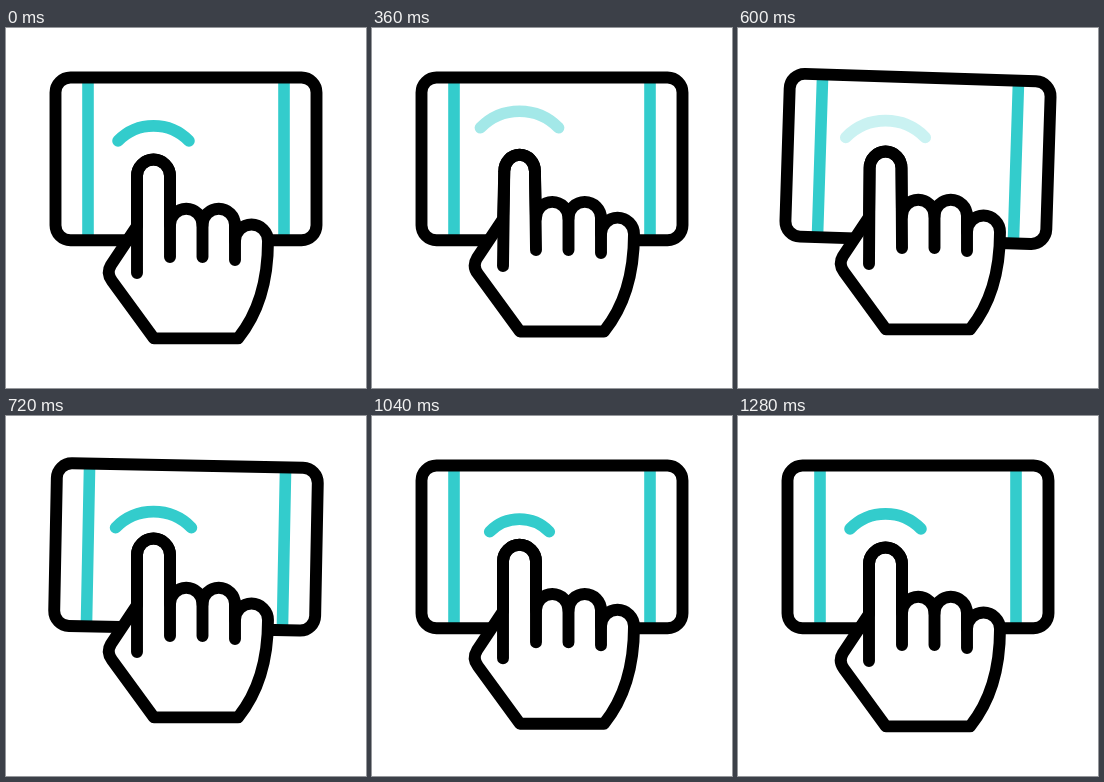
Recreate the animation shown at these times as an HTML page. Size 360x360 px, loop 1.32 s.

```html
<!DOCTYPE html>
<html lang="en">
<head>
<meta charset="utf-8">
<title>Touch screen tap</title>
<style>
  html, body { margin: 0; width: 100%; height: 100%; overflow: hidden; background: #fff; }
  svg { display: block; width: 100vw; height: 100vh; }
  path, rect { fill: none; stroke-linecap: round; stroke-linejoin: round; }
  .ink { stroke: #000; stroke-width: 11.9; }
  .teal { stroke: #33cccc; stroke-width: 11.6; }
  #body { fill: #fff; }
</style>
</head>
<body>
<svg viewBox="0 0 360 360">
  <g id="phone">
    <path class="teal" d="M82 52V210M278 52V210"/>
    <rect class="ink" x="49.5" y="49.5" width="261" height="162.8" rx="15"/>
  </g>
  <path id="wave" class="teal"/>
  <g id="hand">
    <path id="body" class="ink"/>
    <path id="finger" class="ink"/>
  </g>
</svg>
<script>
const LOOP = 1320, STEP = 40;
const $ = id => document.getElementById(id);
const set = (id, name, value) => $(id).setAttribute(name, value);

// Eased 0 to 1 between two times
function ease(t, from, to) {
  const u = Math.min(1, Math.max(0, (t - from) / (to - from)));
  return u * u * (3 - 2 * u);
}

// Rises from 0 to 1 and back between two times
function bump(t, from, to) {
  return t < from || t > to ? 0 : Math.sin(Math.PI * (t - from) / (to - from)) ** 2;
}

function drawPhone(t) {
  set('phone', 'transform', `rotate(${2 * bump(t, 450, 820)} 180 130.75)`);
}

// The ripple grows and drifts off, then returns and settles
function drawWave(t) {
  const size = 1 + 0.12 * ease(t, 120, 440) - 0.29 * ease(t, 640, 940) + 0.17 * ease(t, 1000, 1280);
  const rise = 13.5 * ease(t, 120, 440) * (1 - ease(t, 520, 620));
  const half = 35.5 * size, r = 49.5 * size, y = 130.2 - 17.3 * size - rise;
  set('wave', 'd', `M${147.5 - half} ${y}A${r} ${r} 0 0 1 ${147.5 + half} ${y}`);
  set('wave', 'opacity', 1 - ease(t, 200, 500) + ease(t, 560, 680));
}

// The index finger shortens and narrows while pressing
function drawHand(t) {
  const lift = 9 * ease(t, 120, 470) * (1 - ease(t, 760, 1200));
  const press = 3 * bump(t, 200, 700);
  const l = 131 + press * 0.6, r = 164 - press * 0.5, y = 148 + press;
  const tip = `L${l} ${y}A${(r - l) / 2} 16.5 0 0 1 ${r} ${y}`;
  set('hand', 'transform', `translate(0 ${-lift})`);
  set('body', 'd', `M131 198${tip}L164 197`
    + 'A16.25 16.25 0 0 1 196.5 197A16.25 16.25 0 0 1 229 197V213'
    + 'A16.5 16.5 0 0 1 262 213C262 255 251 287 232 310.4H148L106 253Q100 245 105 237Z');
  set('finger', 'd', `M131 245${tip}L164 229M196.5 197V229M229 197V232`);
}

function tick() {
  const t = Math.floor(performance.now() % LOOP / STEP) * STEP;
  drawPhone(t);
  drawWave(t);
  drawHand(t);
  requestAnimationFrame(tick);
}
tick();
</script>
</body>
</html>
```
